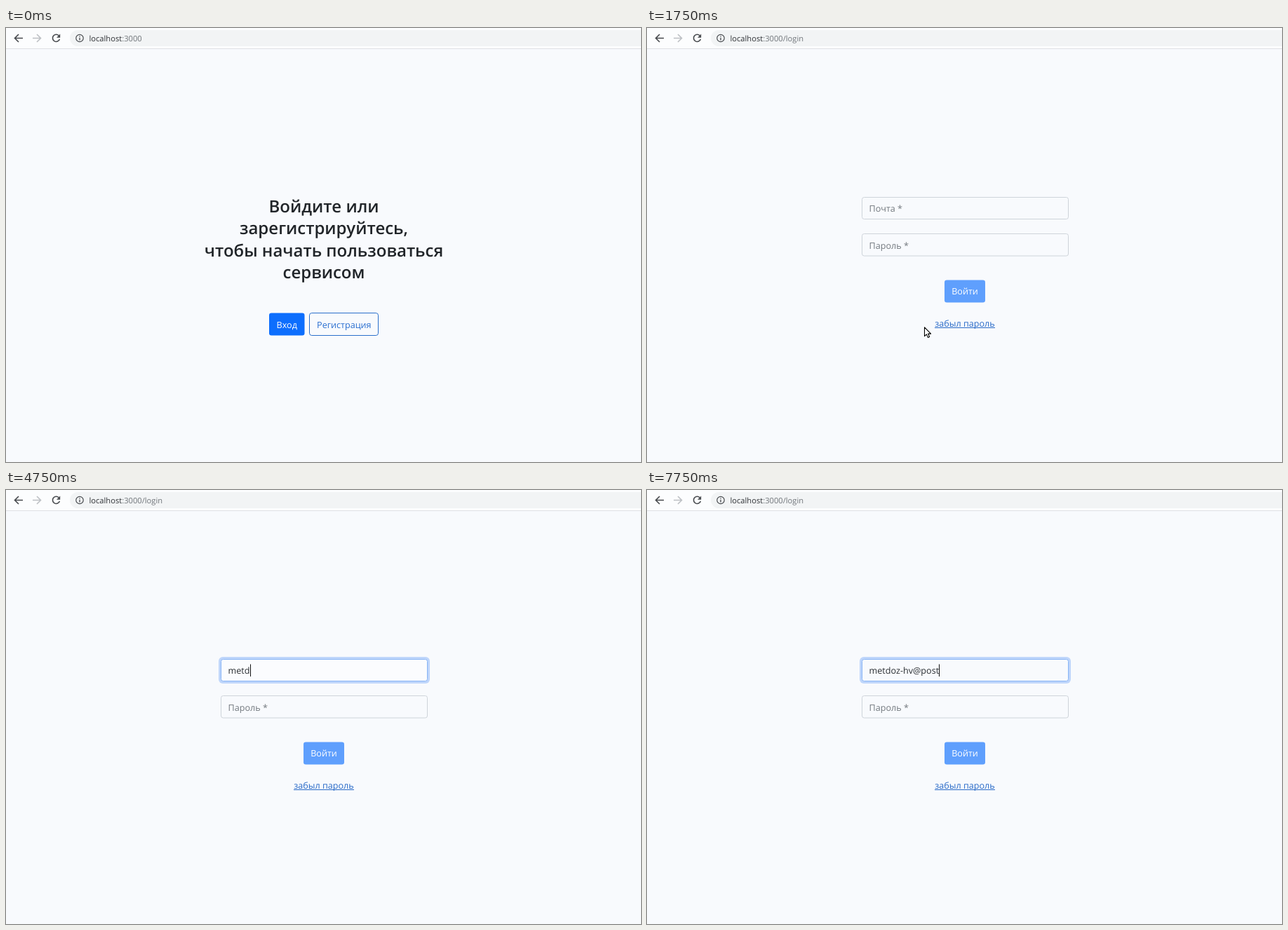
An HTML page for the animation above (8 s loop, 905 px wide and 619 px high).

```html
<!DOCTYPE html>
<html lang="ru">
<head>
<meta charset="utf-8">
<title>Вход</title>
<style>
  html, body { margin: 0; width: 100%; height: 100%; overflow: hidden; background: #f8fafd; }
  svg { display: block; width: 905px; height: 619px; }
  text { font-family: "Open Sans", "Noto Sans", sans-serif; font-size: 12.6px; white-space: pre; text-rendering: geometricPrecision; }
  .mid { text-anchor: middle; }
  .title { font-size: 24px; font-weight: 600; fill: #212529; }
  .url { font-size: 11.15px; fill: #70757a; }
  .hint { fill: #73797f; }
  .icon { fill: none; stroke: #46494d; stroke-width: 1.6; }
  .field { fill: #f8fafd; stroke: #ced4da; }
  .pointer { fill: #fff; stroke: #000; stroke-width: 1.1; stroke-linejoin: round; }
</style>
</head>
<body>
<svg viewBox="0 0 905 619">
  <rect width="905" height="619" fill="#f8fafd"/>

  <g id="toolbar">
    <rect width="905" height="29" fill="#fcfdfe"/>
    <rect x="91" y="3" width="840" height="23" rx="11.5" fill="#f2f4f5"/>
    <rect y="29" width="905" height="1" fill="#dfe1e4"/>
    <path class="icon" d="M24 14.5H13M18 9l-5.5 5.5L18 20"/>
    <path class="icon" style="stroke:#bdc0c4" d="M38 14.5H49M44 9l5.5 5.5L44 20"/>
    <path class="icon" d="M75.2 10.8A5.1 5.1 0 1 0 76.4 16"/>
    <path d="M77.2 8.6v5.2H72z" fill="#46494d"/>
    <circle class="icon" cx="105" cy="14.5" r="5.2" stroke-width="1.2" style="stroke-width:1.2"/>
    <path class="icon" style="stroke-width:1.3" d="M105 13.8v3.7M105 11.2v1.4"/>
    <text class="url" x="118.5" y="18.5"><tspan fill="#303337">localhost</tspan>:3000<tspan id="route"></tspan></text>
  </g>

  <g id="home">
    <g class="title mid">
      <text class="title" x="453" y="263">Войдите или</text>
      <text class="title" x="453" y="294.3">зарегистрируйтесь,</text>
      <text class="title" x="453" y="325.5">чтобы начать пользоваться</text>
      <text class="title" x="453" y="356.8">сервисом</text>
    </g>
    <rect id="enter" x="375" y="406.5" width="50.5" height="32" rx="3.3"/>
    <text class="mid" x="400.2" y="427.5" fill="#fff">Вход</text>
    <rect x="432.5" y="406.5" width="98" height="32" rx="3.3" fill="none" stroke="#2a6fcb"/>
    <text class="mid" x="481.8" y="427.5" fill="#2a6fd0">Регистрация</text>
  </g>

  <g id="login">
    <rect id="ring" x="303" y="238" width="301" height="38" rx="6" fill="#bfd6fb"/>
    <rect id="mail" class="field" x="306.5" y="241.5" width="294" height="31" rx="3"/>
    <text id="hint" class="hint" x="316.6" y="262">Почта *</text>
    <text id="typed" x="316.6" y="262" fill="#2b2f33"></text>
    <rect id="caret" y="248.5" width="1" height="17.5" fill="#111"/>
    <rect class="field" x="306.5" y="293.5" width="294" height="31.5" rx="3"/>
    <text class="hint" x="316.6" y="314.5">Пароль *</text>
    <rect x="424" y="359.5" width="58" height="32" rx="3.3" fill="#5f9ffd"/>
    <text class="mid" x="453" y="380" fill="#fff" font-weight="500">Войти</text>
    <text class="mid" x="453" y="426" fill="#2a6bc8">забыл пароль</text>
    <rect x="410" y="427" width="86" height="1" fill="#2a6bc8"/>
  </g>

  <path id="arrow" class="pointer" d="M.5 .8V13.6L3.4 10.9L5.4 15.4L7.6 14.4L5.6 10.1H9.6Z"/>
  <path id="hand" class="pointer" d="M3.6 11.6V2Q3.6 .6 4.8 .6T6 2V7Q6.4 6 7.4 6.2T8.4 7.4Q9 6.6 9.9 6.9T10.8 8.2Q11.4 7.5 12.2 7.9T13 9.4V13.6Q13 16 11.6 17.4V19.5H5V17.6Q3 15.6 .9 12.2Q.2 10.9 1.2 10.3T3.6 11.6ZM6 7V11M8.4 7.4V11M10.8 8.2V11"/>
</svg>
<script>
const LOOP = 8000;
const OPEN_AT = 1750, FOCUS_AT = 2750;
const ADDRESS = "metdoz-hv@post";

// [start ms, shape, x, y]
const POINTER = [
  [0, ""],
  [1000, "arrow", 376, 362],
  [1250, "hand", 404, 432],
  [1500, "hand", 397, 426],
  [1750, "arrow", 395, 426],
  [2000, "arrow", 421, 406],
  [2250, "arrow", 414, 281],
  [2500, ""]
];
// [start ms, letters typed]
const TYPING = [
  [0, 0], [4250, 1], [4500, 2], [4750, 4], [5000, 6], [5250, 7],
  [5750, 8], [6000, 9], [6500, 10], [7250, 13], [7750, 14]
];
const CARET_OFF = [[3250, 3750], [7000, 7250]];

const el = id => document.getElementById(id);
const show = (id, on) => el(id).setAttribute("display", on ? "inline" : "none");
const stepAt = (steps, t) => steps.filter(s => s[0] <= t).pop();

function draw(t) {
  const opened = t >= OPEN_AT, focused = t >= FOCUS_AT;
  show("home", !opened);
  show("login", opened);
  el("route").textContent = opened ? "/login" : "";
  el("enter").setAttribute("fill", t >= 1250 ? "#0b5ed7" : "#0d6efd");

  const [, shape, x, y] = stepAt(POINTER, t);
  for (const id of ["arrow", "hand"]) {
    show(id, id === shape);
    if (id === shape) el(id).setAttribute("transform", `translate(${x} ${y})`);
  }

  const count = stepAt(TYPING, t)[1];
  const typed = el("typed");
  typed.textContent = ADDRESS.slice(0, count);
  show("hint", !count);
  show("ring", focused);
  el("mail").style.stroke = focused ? "#86b3f5" : "";
  el("mail").style.fill = focused && t < 7500 ? "#fbfcfe" : "";

  show("caret", focused && !CARET_OFF.some(([a, b]) => t >= a && t < b));
  const end = opened && count ? typed.getComputedTextLength() : 0;
  el("caret").setAttribute("x", Math.round(316.6 + end));
}

const start = performance.now();
function tick() {
  draw((performance.now() - start) % LOOP);
  requestAnimationFrame(tick);
}
tick();
</script>
</body>
</html>
```
